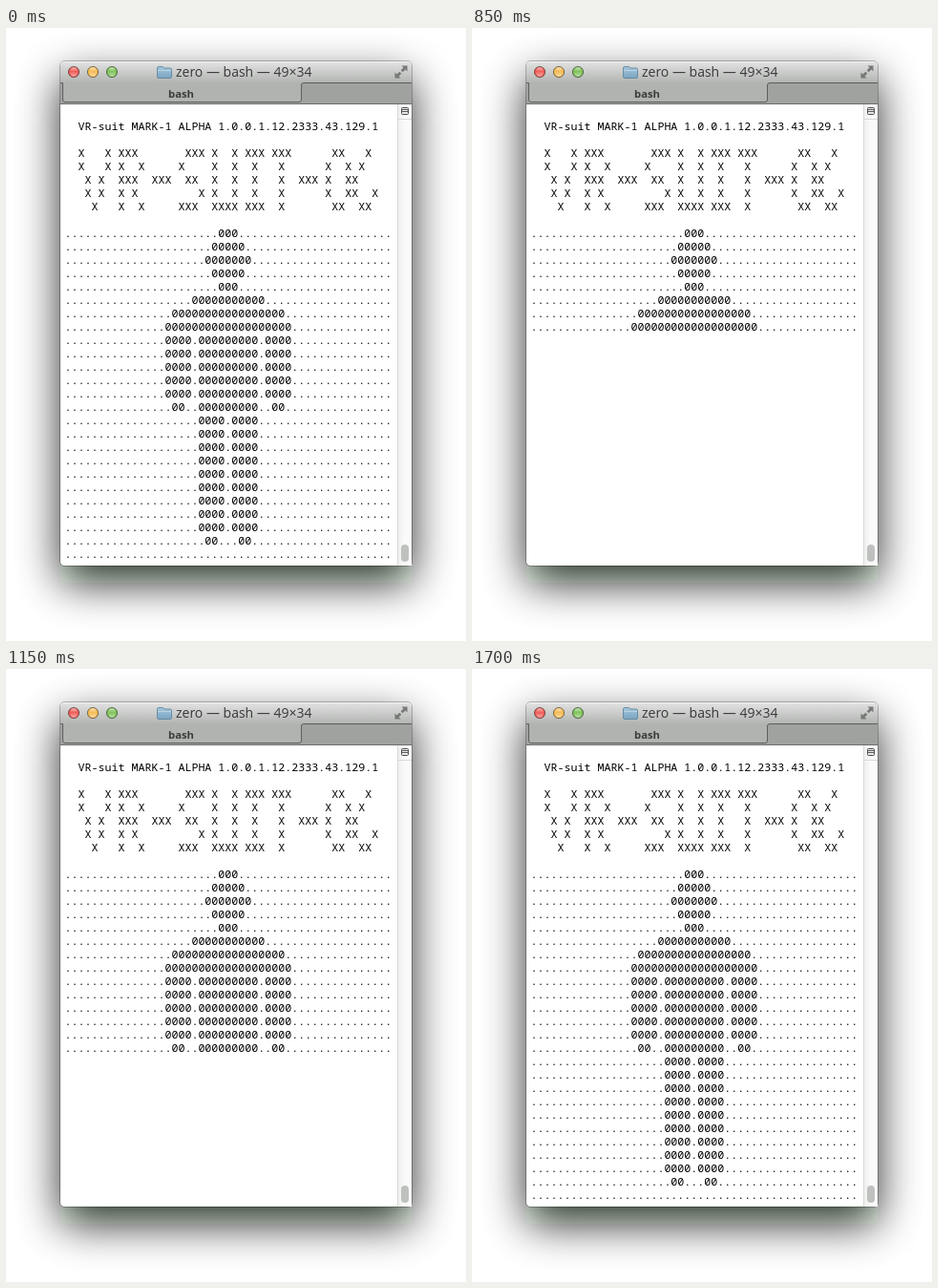
These frames come from a looping animation (482 px wide and 642 px high, 2700 ms). An HTML page:

```html
<!DOCTYPE html>
<html lang="en">
<head>
<meta charset="utf-8">
<title>Terminal figure</title>
<style>
  html, body { margin: 0; width: 100%; height: 100%; overflow: hidden; background: #fefffe; }
  svg { display: block; }
  .title { font: 14px "Open Sans", "Noto Sans", sans-serif; fill: #383838; }
  .tab { font: bold 11.3px "Open Sans", "Noto Sans", sans-serif; fill: #3c3c3c; }
  #screen text { font: 500 11.667px "Noto Sans Mono", "DejaVu Sans Mono", monospace; white-space: pre; }
</style>
</head>
<body>
<svg width="482" height="642" viewBox="0 0 482 642">
  <defs>
    <filter id="blur" x="-30%" y="-30%" width="160%" height="160%"><feGaussianBlur stdDeviation="23"/></filter>
    <linearGradient id="bar" x2="0" y2="1"><stop stop-color="#e2e3e2"/><stop offset="1" stop-color="#b1b3b1"/></linearGradient>
    <linearGradient id="track"><stop stop-color="#ededed"/><stop offset=".5" stop-color="#fafafa"/><stop offset="1" stop-color="#fafafa"/></linearGradient>
    <linearGradient id="gloss" x2="0" y2="1"><stop stop-color="#fff" stop-opacity=".6"/><stop offset=".45" stop-color="#fff" stop-opacity=".05"/><stop offset="1" stop-color="#fff" stop-opacity=".5"/></linearGradient>
    <linearGradient id="folder" x2="0" y2="1"><stop stop-color="#a5c6dc"/><stop offset="1" stop-color="#7ba5c1"/></linearGradient>
  </defs>

  <rect x="57" y="53" width="368" height="528" rx="5" fill="#000a04" opacity=".84" filter="url(#blur)"/>
  <rect x="56.5" y="34.5" width="369" height="529" rx="5" fill="none" stroke="#000" stroke-opacity=".25"/>

  <!-- window frame -->
  <rect x="57" y="35" width="368" height="528" rx="4.5" fill="#fefffe"/>
  <path d="M57 58V39.500a4.500 4.500 0 0 1 4.500-4.500H420.500a4.500 4.500 0 0 1 4.500 4.500V58z" fill="url(#bar)"/>
  <path d="M61 35.500H421" stroke="#f3f4f3"/>
  <path d="M57 58H425V80H57z" fill="#a0a2a0"/>
  <path d="M59.500 57V75q0 2.500 2.500 2.500H307q2.500 0 2.500-2.500V57z" fill="#b1b3b1"/>
  <path d="M57 57.500H59.500V75q0 2.500 2.500 2.500H307q2.500 0 2.500-2.500V60q0-2.500 2.500-2.500H425" fill="none" stroke="#5c5e5c"/>
  <path d="M57 79.500H425" stroke="#6c6e6c"/>

  <g id="lights"></g>
  <g stroke="#56809d" stroke-width=".8">
    <path d="M158.500 51V42q0-1.500 1.500-1.500h4.500l1.500 1.500h6q1.500 0 1.500 1.500V51q0 1.500-1.500 1.500H160q-1.500 0-1.500-1.500z" fill="url(#folder)"/>
    <path d="M159 44.500H173" stroke="#c3dae8"/>
  </g>
  <text class="title" x="178" y="51">zero — bash — 49×34</text>
  <text class="tab" x="183.500" y="73" text-anchor="middle">bash</text>
  <g fill="#777977">
    <path id="arrow" d="M414.500 39.500H420.500V45.500L418.500 43.500L415.700 46.300L413.700 44.300L416.500 41.500z"/>
    <use href="#arrow" transform="rotate(180 414 46)"/>
  </g>

  <!-- scroll bar -->
  <rect x="410" y="80" width="15" height="483" fill="url(#track)"/>
  <path d="M410.500 80V563M410 95.500H425" stroke="#d8d9d8"/>
  <rect x="414.500" y="83.500" width="7" height="7" rx="1" fill="#e8e8e8" stroke="#4b4d4b"/>
  <path d="M415 85.500H421M415 87.500H421" stroke="#5c5e5c"/>
  <rect x="414" y="541" width="8" height="18" rx="4" fill="#bfc1bf"/>

  <g id="screen"></g>
</svg>
<script>
const SVG = "http://www.w3.org/2000/svg";
const LOOP = 2700, ROW_TIME = 50, CLEAR_AT = 500;

function add(parent, tag, attributes, text = "") {
  const node = document.createElementNS(SVG, tag);
  for (const name in attributes) node.setAttribute(name, attributes[name]);
  node.textContent = text;
  document.getElementById(parent).append(node);
  return node;
}

["#ef5650", "#f4b74c", "#79bf52"].forEach((color, i) => {
  const cx = 71 + 20 * i;
  add("lights", "circle", { cx, cy: 46, r: 5.6, fill: color, stroke: "#000", "stroke-opacity": .45 });
  add("lights", "ellipse", { cx, cy: 46, rx: 4, ry: 4.8, fill: "url(#gloss)" });
});

const header = [
  "  VR-suit MARK-1 ALPHA 1.0.0.1.12.2333.43.129.1",
  "",
  "  X   X XXX       XXX X  X XXX XXX      XX   X",
  "  X   X X  X     X    X  X  X   X      X  X X",
  "   X X  XXX  XXX  XX  X  X  X   X  XXX X  XX",
  "   X X  X X         X X  X  X   X      X  XX  X",
  "    X   X  X     XXX  XXXX XXX  X       XX  XX",
  "",
];

const zeros = count => "0".repeat(count);
const figure = [
  ...[3, 5, 7, 5, 3, 11, 17, 19].map(zeros),
  ...Array(5).fill("0000.000000000.0000"),
  "00..000000000..00",
  ...Array(9).fill("0000.0000"),
  "00...00",
  ".",
].map(row => {
  const side = ".".repeat((49 - row.length) / 2);
  return side + row + side;
});

const lines = [...header, ...figure].map((line, i) =>
  add("screen", "text", { x: 61.5, y: 107 + 14 * i }, line));
const rows = lines.slice(header.length);

function draw(now) {
  const t = now % LOOP;
  const shown = t < CLEAR_AT ? rows.length : 1 + Math.floor((t - CLEAR_AT) / ROW_TIME);
  rows.forEach((row, i) => row.setAttribute("visibility", i < shown ? "visible" : "hidden"));
}

const start = performance.now();
function frame() {
  draw(performance.now() - start);
  requestAnimationFrame(frame);
}
frame();
</script>
</body>
</html>
```
